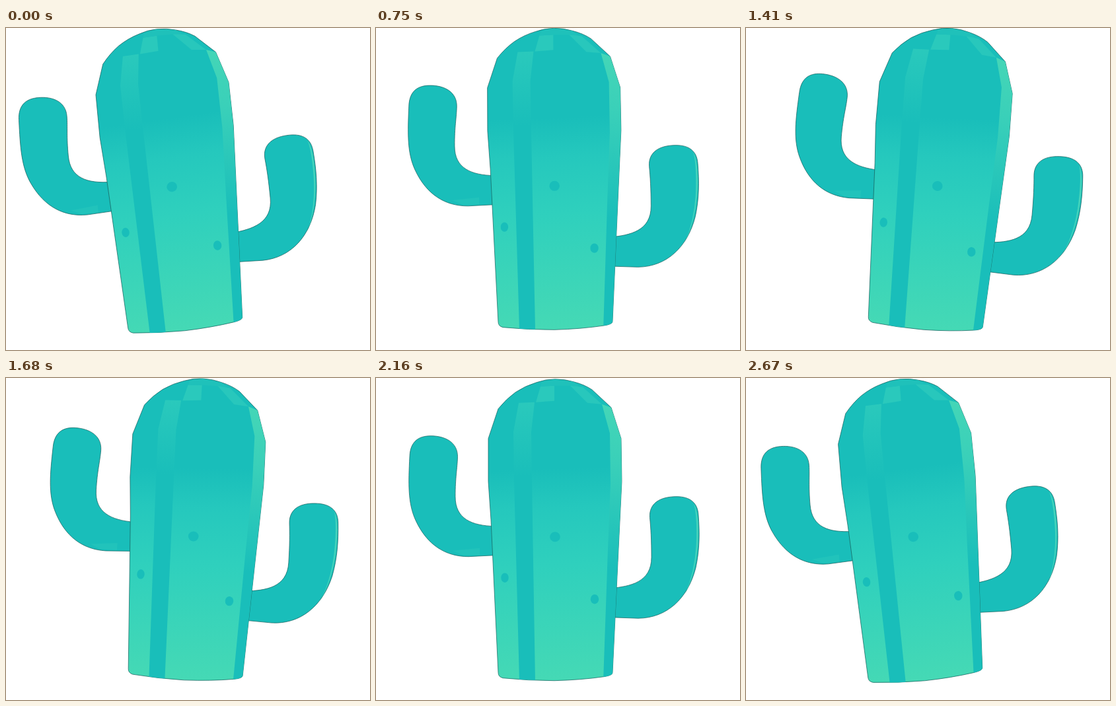
Recreate the animation shown at these times as an HTML page. Size 551x488 px, loop 2.7 s.

```html
<!DOCTYPE html>
<html lang="en">
<head>
<meta charset="utf-8">
<title>Swaying cactus</title>
<style>
  html, body { margin: 0; height: 100%; overflow: hidden; background: #fff; }
  svg { display: block; }
  .outline { stroke: #175f5c; stroke-width: .7; stroke-linejoin: round; }
</style>
</head>
<body>
<svg width="551" height="488" viewBox="0 0 551 488">
  <defs>
    <linearGradient id="skin" gradientUnits="userSpaceOnUse" x1="262" y1="0" x2="280" y2="458">
      <stop offset=".3" stop-color="#19beba"/>
      <stop offset=".43" stop-color="#25c8bd"/>
      <stop offset=".62" stop-color="#2fd0bd"/>
      <stop offset="1" stop-color="#45d9b5"/>
    </linearGradient>
    <linearGradient id="stripe" gradientUnits="userSpaceOnUse" x1="0" y1="37" x2="0" y2="150">
      <stop offset="0" stop-color="#2ac9bc"/>
      <stop offset="1" stop-color="#19beba"/>
    </linearGradient>
    <linearGradient id="edge" gradientUnits="userSpaceOnUse" x1="0" y1="40" x2="0" y2="290">
      <stop offset="0" stop-color="#44d6b7"/>
      <stop offset=".35" stop-color="#3ad0b9"/>
      <stop offset="1" stop-color="#19beba"/>
    </linearGradient>
    <clipPath id="trunk">
      <path id="trunkShape" d="M185 447 L174 215 L170 157 V92 L185 47 Q197 32 211 22 Q226 12 243 7
        Q257 2 271 2 Q286 2 299 6 Q315 10 327 18 L356 45 L371 92 L372 157 L366 280 L358 447
        Q358 451 345 453 Q310 458 270 459 Q230 459 192 455 Q185 453 185 447Z"/>
    </clipPath>
  </defs>
  <g id="cactus">
    <g fill="#19beba" class="outline">
      <path d="M180 225 C145 224 120 214 120 180 C120 150 123 138 123.500 120
        C124 98 105 88 83 88 C66 88 52 95 51 119 C49 160 48 190 60 216
        C77 253 105 271 140 271 L180 269Z"/>
      <path d="M355 319 C385 316 417 310 417 272 C417 245 416 228 414.500 212
        C413 190 430 180 455 180 C475 180 487 189 488 208 C490 235 490 260 484 288
        C472 335 440 364 397 364.500 L355 363Z"/>
    </g>
    <path d="M116 262 L157 258 V269 H132Z" fill="#21c3bb"/>
    <path d="M481 190 Q487 202 487.500 222 Q490 282 468 328 Q484 290 485 245 Q486 208 481 190Z" fill="#43d3bb"/>
    <use href="#trunkShape" fill="url(#skin)" class="outline"/>
    <g clip-path="url(#trunk)">
      <path d="M216 38 L240 37 L235 82 L236 155 L241 460 H217 L209 155 L208 82Z" fill="url(#stripe)"/>
      <path d="M249 13 L270 12 V35 L242 37Z" fill="#2ac9bc"/>
      <path d="M270 12 L294 12 L311 16 L299 6 L271 2 L251 6 L249 13Z" fill="#1fc1ba"/>
      <path d="M294 12 L313 14 L342 40 L320 38Z" fill="#28c7bc"/>
      <path d="M342 40 L356 45 L374 92 V157 L362 460 H344 L351 260 L355 160 L354 84Z" fill="url(#edge)"/>
    </g>
    <g fill="#19beba">
      <ellipse cx="271" cy="241" rx="7.800" ry="7.500"/>
      <ellipse cx="195" cy="303" rx="5.700" ry="7.200"/>
      <ellipse cx="331" cy="335.500" rx="6.200" ry="7.200"/>
    </g>
  </g>
</svg>
<script>
const LOOP = 2700, STEP = 30;
const PIVOT = { x: 272, y: 450 };
const cactus = document.getElementById('cactus');

// Lean over time: [ms, radians], joined by smooth curves.
const keys = [
  [0, -.095], [450, -.0515], [1050, .05], [1300, .1], [1410, .09],
  [1680, .061], [2160, 0], [2670, -.085], [LOOP, -.095]
];

function slope(i) {
  const before = keys[i - 1], after = keys[i + 1];
  if (!before || !after) return 0;
  const value = keys[i][1];
  if ((value - before[1]) * (after[1] - value) <= 0) return 0;
  return (after[1] - before[1]) / (after[0] - before[0]);
}

function leanAt(t) {
  const i = keys.findIndex((key, n) => n && t < key[0]) - 1;
  const [t0, a] = keys[i], [t1, b] = keys[i + 1];
  const span = t1 - t0, u = (t - t0) / span, v = 1 - u;
  return v * v * (1 + 2 * u) * a + u * u * (1 + 2 * v) * b
    + span * u * v * (v * slope(i) - u * slope(i + 1));
}

function draw(now) {
  const t = Math.floor(now % LOOP / STEP) * STEP;
  const lean = leanAt(t);
  const bob = -1 + .8 * Math.cos((t - 2360) / LOOP * 2 * Math.PI);
  cactus.setAttribute('transform',
    `matrix(1 ${lean} ${-lean} 1 ${lean * PIVOT.y} ${bob - lean * PIVOT.x})`);
}

let start;
function tick(now) {
  start ??= now;
  draw(now - start);
  requestAnimationFrame(tick);
}
draw(0);
requestAnimationFrame(tick);
</script>
</body>
</html>
```
